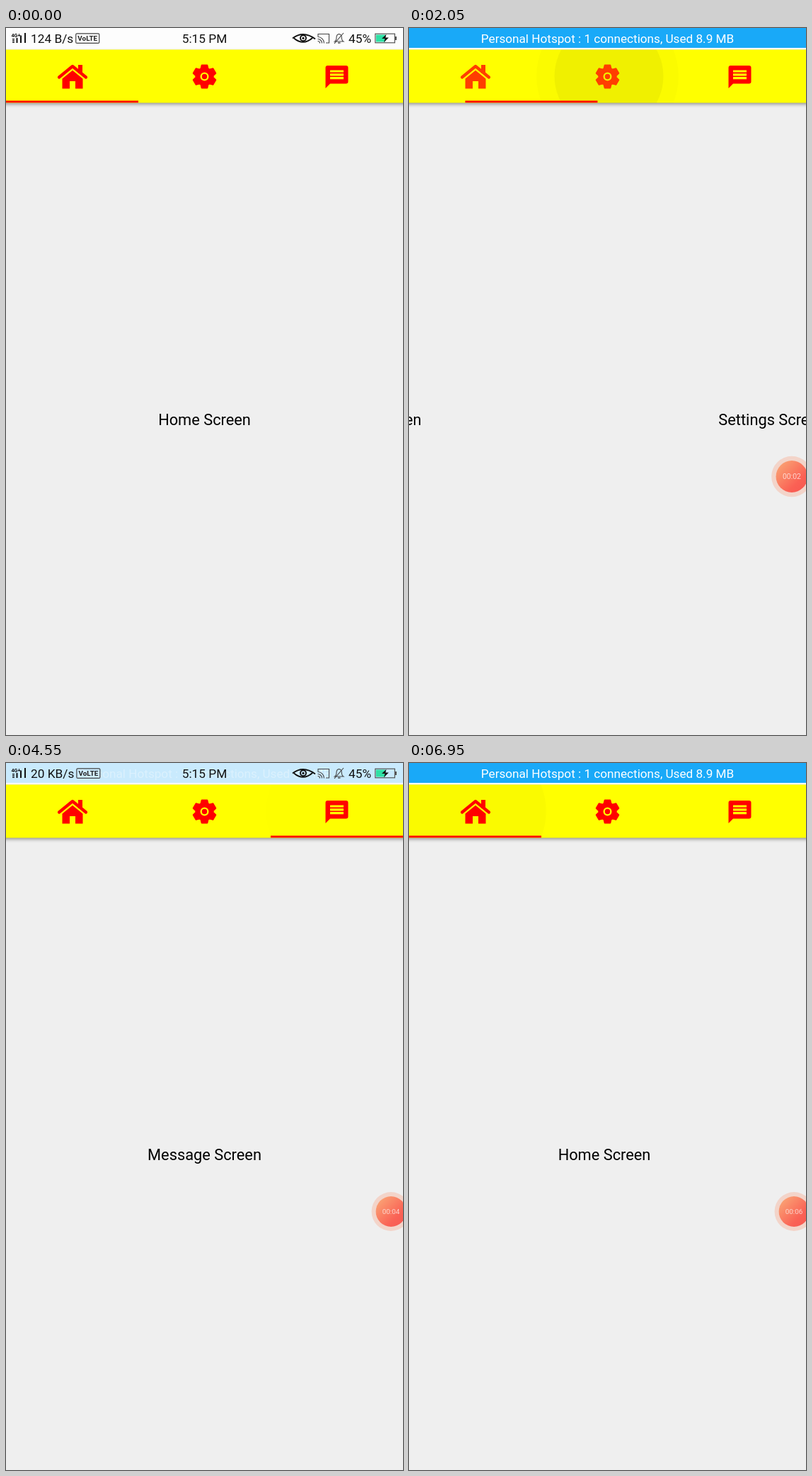
An HTML page with a canvas for the animation above (7000 ms loop, 561 by 997 pixels).

```html
<!DOCTYPE html>
<html lang="en">
<head>
<meta charset="utf-8">
<title>Tab screens</title>
<style>
  html, body { margin: 0; width: 100%; height: 100%; overflow: hidden; background: #efefef; }
  canvas { display: block; width: 561px; height: 997px; }
</style>
</head>
<body>
<canvas id="stage" width="561" height="997"></canvas>
<script>
const ctx = document.getElementById('stage').getContext('2d');
const W = 561, H = 997, LOOP = 7000, TAB = W / 3;
const FONT = 'Roboto, "Noto Sans", sans-serif';
const BAR = { top: 30.5, bottom: 105.5 };
const LABELS = ['Home Screen', 'Settings Screen', 'Message Screen'];
// Tab switches: start time, tab index, touch offset from the tab centre
const TAPS = [
  { at: 1928, tab: 1, dx: 6, dy: 0 },
  { at: 3800, tab: 2, dx: 6, dy: -3 },
  { at: 5394, tab: 1, dx: 8, dy: -3 },
  { at: 6520, tab: 0, dx: 6, dy: -3 }
];

const clamp = v => Math.max(0, Math.min(1, v));
const ramp = (t, a, b) => clamp((t - a) / (b - a));
const mix = (a, b, k) => a + (b - a) * k;
const smooth = k => (1 - Math.cos(Math.PI * k)) / 2;

function spring(ms, rate) {
  if (ms <= 0) return 0;
  const x = ms * rate, p = 1 - (1 + x) * Math.exp(-x);
  return p > 0.994 ? 1 : p;
}

function position(t, rate, delay) {
  return TAPS.reduce((p, s) => mix(p, s.tab, spring(t - s.at - delay, rate)), 0);
}

function disc(x, y, r, fill) {
  ctx.fillStyle = fill;
  ctx.beginPath();
  ctx.arc(x, y, r, 0, 7);
  ctx.fill();
}

function text(str, x, y, size, fill, align = 'left', weight = 400) {
  ctx.font = `${weight} ${size}px ${FONT}`;
  ctx.textAlign = align;
  ctx.fillStyle = fill;
  ctx.fillText(str, x, y);
}

function poly(points) {
  ctx.beginPath();
  points.forEach(([x, y]) => ctx.lineTo(x, y));
}

function line(points, width, color) {
  poly(points);
  ctx.lineWidth = width;
  ctx.strokeStyle = color;
  ctx.stroke();
}

function homeIcon(color) {
  ctx.fillStyle = color;
  ctx.lineCap = ctx.lineJoin = 'round';
  line([[75, 69.5], [94, 54], [113, 69.5]], 4.2, color);
  ctx.fillRect(102, 52, 6, 12);
  poly([[79.5, 71.5], [94, 59.8], [108.5, 71.5], [108.5, 85.5], [98, 85.5], [98, 75], [90, 75], [90, 85.5], [79.5, 85.5]]);
  ctx.fill();
}

function gearIcon(color) {
  const cx = 280.5, cy = 68.5, teeth = [];
  for (let i = 0; i < 6; i++) {
    const a = i * Math.PI / 3 - Math.PI / 2;
    for (const [r, w] of [[11.2, -5], [16, -3.8], [16, 3.8], [11.2, 5]]) {
      teeth.push([cx + r * Math.cos(a) - w * Math.sin(a), cy + r * Math.sin(a) + w * Math.cos(a)]);
    }
  }
  poly(teeth);
  ctx.closePath();
  for (const r of [6, 3.7]) {
    ctx.moveTo(cx + r, cy);
    ctx.arc(cx, cy, r, 0, 7);
  }
  ctx.fillStyle = color;
  ctx.fill('evenodd');
  poly(teeth);
  ctx.closePath();
  ctx.lineJoin = 'round';
  ctx.lineWidth = 2;
  ctx.strokeStyle = color;
  ctx.stroke();
}

function messageIcon(color) {
  ctx.beginPath();
  ctx.moveTo(451.5, 85);
  ctx.lineTo(451.5, 56);
  ctx.arcTo(451.5, 53, 455, 53, 3);
  ctx.arcTo(483.5, 53, 483.5, 56, 3);
  ctx.arcTo(483.5, 78.6, 480, 78.6, 3);
  ctx.lineTo(458, 78.6);
  ctx.closePath();
  for (const y of [59.4, 64.2, 69]) ctx.rect(458, y, 19, 3.2);
  ctx.fillStyle = color;
  ctx.fill('evenodd');
}

function eyeIcon(ink) {
  ctx.beginPath();
  ctx.moveTo(405, 14.5);
  ctx.quadraticCurveTo(420, 3, 437, 15.5);
  ctx.moveTo(407, 14.5);
  ctx.quadraticCurveTo(420, 25.5, 433, 14);
  ctx.lineWidth = 1.9;
  ctx.strokeStyle = ink;
  ctx.stroke();
  ctx.beginPath();
  ctx.arc(420, 14.3, 4, 0, 7);
  ctx.stroke();
  disc(420, 14.3, 1.6, ink);
}

function castIcon(ink) {
  ctx.lineCap = 'butt';
  line([[441, 12], [441, 8.5], [456.5, 8.5], [456.5, 21], [452, 21]], 1.1, ink);
  for (const r of [3, 6, 9]) {
    ctx.beginPath();
    ctx.arc(440.5, 21.5, r, -Math.PI / 2, 0);
    ctx.stroke();
  }
}

function bellIcon(ink) {
  ctx.beginPath();
  ctx.moveTo(464.5, 19);
  ctx.quadraticCurveTo(467, 17.5, 467, 13);
  ctx.quadraticCurveTo(467.3, 9, 470.5, 8.5);
  ctx.quadraticCurveTo(474, 9, 474.3, 13);
  ctx.quadraticCurveTo(474.3, 17.5, 476.8, 19);
  ctx.closePath();
  ctx.lineWidth = 1.1;
  ctx.strokeStyle = ink;
  ctx.stroke();
  line([[469, 21], [472.5, 21]], 1.4, ink);
  line([[464, 21.8], [477, 7]], 1.1, ink);
}

function battery() {
  ctx.fillStyle = '#2fe0a4';
  ctx.fillRect(523, 9.5, 13, 10);
  ctx.lineWidth = 1.2;
  ctx.strokeStyle = '#555';
  ctx.strokeRect(521.8, 8.2, 27.6, 12.6);
  ctx.fillStyle = '#555';
  ctx.fillRect(550, 12, 2, 5);
  poly([[537.5, 8.8], [531, 15], [535.5, 15], [534, 20.2], [540.8, 13.6], [536.3, 13.6]]);
  ctx.fillStyle = '#111';
  ctx.fill();
}

function statusItems(t) {
  const ink = '#111', soft = '#444';
  text('4G+', 7.5, 13, 7.2, ink, 'left', 700);
  ctx.fillStyle = ink;
  for (const [x, h] of [[14.5, 7], [20, 10.5], [26, 14]]) ctx.fillRect(x, 21 - h, 2, h);
  for (const y of [15, 17.3, 19.6]) ctx.fillRect(9, y, 3, 1.3);

  const speed = t < 3000 ? '124 B/s' : t < 4000 ? '1 KB/s' : '20 KB/s';
  text(speed, 35, 20.5, 17.3, ink);
  const x = 35 + ctx.measureText(speed).width + 3.5;
  ctx.lineWidth = 1.2;
  ctx.strokeStyle = soft;
  ctx.beginPath();
  ctx.roundRect(x, 7.8, 33, 13.6, 1.5);
  ctx.stroke();
  text('VoLTE', x + 16.5, 18.2, 9.9, '#222', 'center', 700);

  text('5:15 PM', 280.5, 21, 17.3, ink, 'center');
  eyeIcon(ink);
  castIcon(soft);
  bellIcon(soft);
  text('45%', 484, 20.5, 17.3, ink);
  battery();
}

function statusBar(t) {
  const shown = t < 2500 ? ramp(t, 350, 1140) : t < 4200 ? 1 - ramp(t, 3070, 4070) : ramp(t, 4370, 5170);
  ctx.fillStyle = '#fdfdfd';
  ctx.fillRect(0, 0, W, 30.5);
  ctx.globalAlpha = shown;
  ctx.fillStyle = '#19a9f8';
  ctx.fillRect(0, 0, W, 28);
  ctx.globalAlpha = clamp(shown * 1.5);
  text('Personal Hotspot : 1 connections, Used 8.9 MB', 280.5, 21, 17.15, '#fff', 'center');
  if (shown < 1) {
    ctx.globalAlpha = clamp((1 - shown) * 1.45);
    statusItems(t);
  }
  ctx.globalAlpha = 1;
}

function ripple(t, { at, tab, dx, dy }) {
  const e = t - at - 54;
  if (e < 0 || e > 800) return;
  const cx = (tab + 0.5) * TAB, cy = 68;
  const grow = 1 - Math.pow(1 - clamp(e / 225), 3);
  disc(cx, cy, 100.5, `rgba(0,0,0,${0.014 * (1 - ramp(e, 300, 780))})`);
  disc(cx + dx * (1 - grow), cy + dy * (1 - grow), mix(30, 100.5, grow),
    `rgba(0,0,0,${0.042 * (1 - ramp(e, 200, 420))})`);
}

function header(t) {
  const pos = position(t, 0.0204, 52);
  ctx.save();
  ctx.shadowColor = 'rgba(0,0,0,0.4)';
  ctx.shadowBlur = 5;
  ctx.shadowOffsetY = 2;
  ctx.fillStyle = '#ff0';
  ctx.fillRect(-8, BAR.top, W + 16, BAR.bottom - BAR.top);
  ctx.restore();

  ctx.save();
  ctx.beginPath();
  ctx.rect(0, BAR.top, W, BAR.bottom - BAR.top);
  ctx.clip();
  TAPS.forEach(tap => ripple(t, tap));
  // Active and inactive icon layers cross-fade, letting some yellow through
  [homeIcon, gearIcon, messageIcon].forEach((icon, i) => {
    const a = clamp(1 - Math.abs(pos - i));
    icon(`rgb(255,${Math.round(255 * a * (1 - a))},0)`);
  });
  ctx.fillStyle = '#ff0000';
  ctx.fillRect(pos * TAB, 102.5, TAB, 3);
  ctx.restore();
}

function recorder(t) {
  const enter = smooth(ramp(t, 150, 350));
  if (!enter) return;
  const dock = smooth(ramp(t, 1835, 2135));
  const s = mix(1, 0.8, dock);
  const count = '00:0' + Math.floor(t / 1000);
  ctx.save();
  ctx.globalAlpha = enter * mix(1, 0.7, clamp(dock * 1.2));
  ctx.translate(mix(526.8, 544, dock), 632.5);
  ctx.scale(s, s);
  ctx.beginPath();
  ctx.arc(0, 0, 34.3, 0, 7);
  ctx.arc(0, 0, 26.8, 0, 7);
  ctx.fillStyle = 'rgba(255,110,60,0.3)';
  ctx.fill('evenodd');
  const g = ctx.createLinearGradient(-19, -19, 19, 19);
  g.addColorStop(0, '#ff7a3c');
  g.addColorStop(0.75, '#ff2614');
  g.addColorStop(1, '#fc1c10');
  disc(0, 0, 26.8, g);
  text(count, 0, 4.6, 12.4, '#fff', 'center');
  ctx.restore();
}

function draw(t) {
  ctx.fillStyle = '#efefef';
  ctx.fillRect(0, 0, W, H);
  const pos = position(t, 0.016, 0);
  LABELS.forEach((label, i) => text(label, W / 2 + (i - pos) * W, 560.3, 21.8, '#000', 'center'));
  statusBar(t);
  header(t);
  recorder(t);
}

const start = performance.now();
function tick() {
  draw((performance.now() - start) % LOOP);
  requestAnimationFrame(tick);
}
tick();
</script>
</body>
</html>
```
